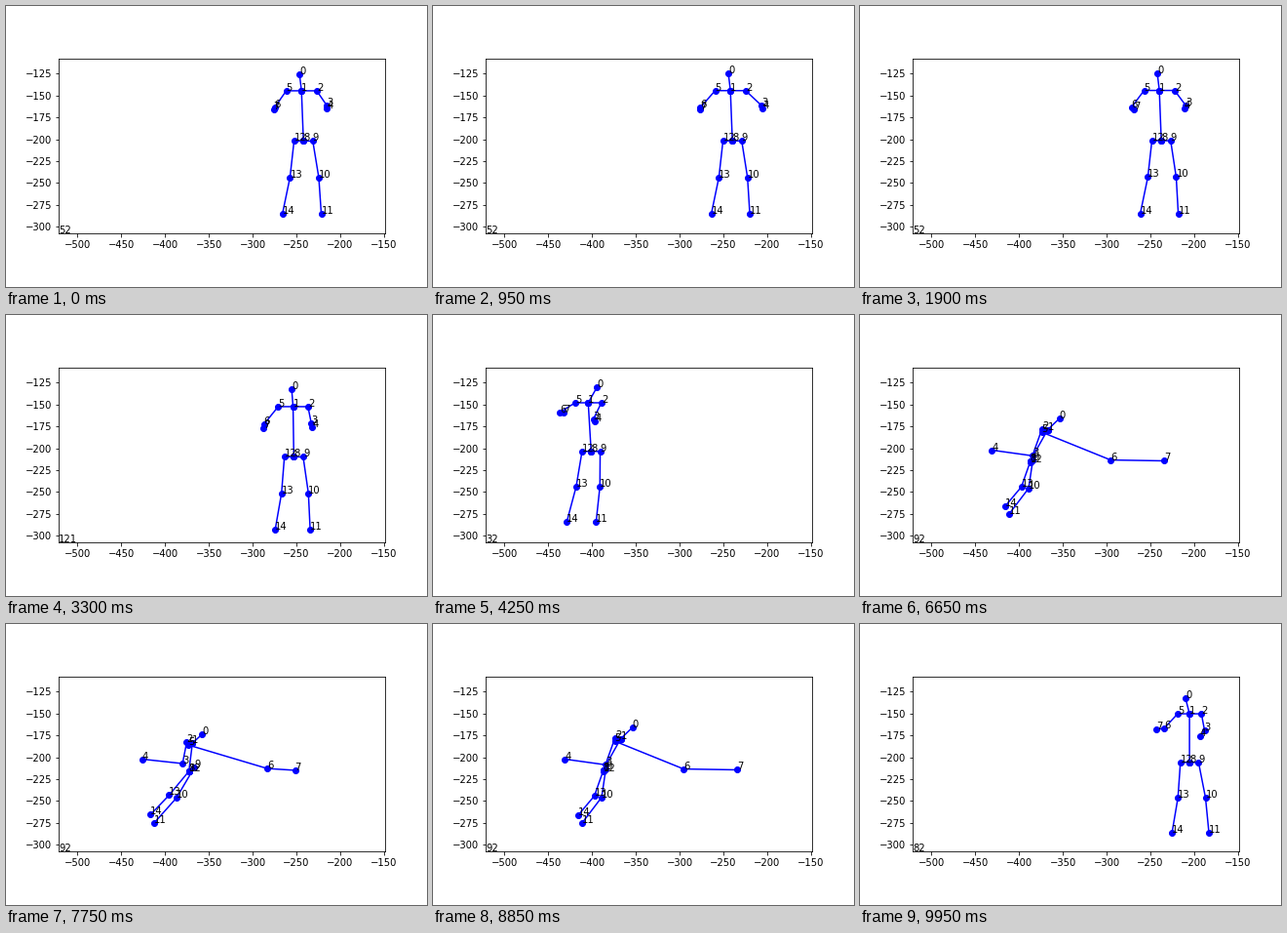
A matplotlib script for the animation above (10000 ms loop, 432 px wide and 288 px high).

```python
import numpy as np
import matplotlib.pyplot as plt
from matplotlib.animation import FuncAnimation

FRAMES, STEP_MS = 200, 50
X_LIM, Y_LIM = (-521.4, -149), (-307, -108)
LIMBS = [[0, 1, 8], [1, 2, 3, 4], [1, 5, 6, 7], [8, 9, 10, 11], [8, 12, 13, 14]]

# Points are complex numbers, x + y*1j, in data units.


def standing(neck, head, arms, hip, feet, half=17, size=1.0):
    """Upright figure; all arguments after neck are offsets from it."""
    hip = hip - 57.3j * size
    feet = [x - 140.5j * size for x in feet]
    hips = [hip + 10.7 * size, hip - 10.7 * size]
    right, left = ([h, (h + f) / 2 + 2, f] for h, f in zip(hips, feet))
    body = [head, 0, half, *arms[:2], -half, *arms[2:], hip, *right, *left]
    return neck + np.array(body)


def bent_over(e, lift):
    """Figure leaning forward; e shifts the weight, lift raises and reaches."""
    neck = -367.7 - 183.9j - e + lift * (1 + 5j)
    hip = -402 - 213.3j + e * (29.3 - 2.7j)
    near_arm = [-389.3 - 210j + e * (9.3 + 2.8j), -421.6 - 202.2j - 4.6 * e - 7 * lift]
    far_arm = [-307.7 - 213.9j + e * (24.5 + 1j), -241.6 - 213.9j - e * (10 + 1j) + 12 * lift]
    right = [hip - 3.5j + e * (6 + 7.5j), -391 - 245j + e * (4 - 1.5j),
             -410.4 - 275.4j - 2.4 * e]
    left = [hip - 2.5j + 2.5j * e, -399.3 - 245j + e * (4 + 1.7j),
            -415 - 266.7j - e * (1.6 - 1.2j)]
    head = neck + 16 + 10j - 5 * e + 3j * lift
    return np.array([head, neck, neck - 6.5 + 1j, *near_arm,
                     neck - 9.3 - 3.3j + e * (5 + 1j), *far_arm, hip, *right, *left])


def swing(n, start, span):
    """Ease 0-1-0 over two spans, and a bulge that peaks half-way."""
    phase = np.pi * (n - start) / span
    return (1 - np.cos(phase)) / 2, np.sin(phase) ** 2


def rock(n, centre):
    return 2.5 * np.sin(2 * np.pi * (n - centre) / 30)


def arms_bent(n):
    e, flare = swing(n, 0, 38)
    arms = [29.2 - 17.2j + e + 6 * flare, 29.2 - 20.2j - 0.5 * e + 8 * flare,
            -30.8 - 19.2j - e - 3 * flare, -31.8 - 21.2j + 3 * e - 4 * flare]
    return standing(-244.2 - 144.8j + e * (4.4 + 0.4j), -2.3 + 19.3j, arms,
                    2.2, (22.6 - e, -21.8), half=17.4)


def arms_down(n):
    arms = [20.8 - 19j, 21.8 - 23.2j, -33.2 - 20j, -34 - 24.4j]
    return standing(-253.8 - 152.6j + rock(n, 66), -1.6 + 19.8j, arms, 0.8, (19.5, -20.5))


def turned(n):
    arms = [6 - 18.4j, 7.8 - 21.1j, -32.7 - 11.1j, -28.4 - 11.1j]
    return standing(-404.3 - 148.2j + rock(n, 85), 10 + 17.8j, arms,
                    3.3, (9, -24.5), half=15, size=0.967)


def arm_out(n):
    arms = [17.2 - 18.9j, 11.6 - 25.5j, -28.9 - 16.7j, -37.8 - 17.8j]
    return standing(-205.4 - 150.5j + rock(n, 199), -4.5 + 17.7j, arms,
                    0, (22.2, -20), half=13.6, size=0.967)


def leaning(n):
    return bent_over(*swing(n, 111, 44))


# Hard cuts: (end frame, caption, pose)
SCENES = [(53, "52", arms_bent), (74, "121", arms_down), (95, "32", turned),
          (182, "92", leaning), (FRAMES, "82", arm_out)]

plt.rcParams.update({"font.family": "DejaVu Sans", "font.size": 10})
fig = plt.figure(figsize=(6, 4), dpi=72, facecolor="white")
fig.subplots_adjust(left=0.125, right=0.9, bottom=0.125, top=0.88)
ax = fig.add_subplot()
ax.set(xlim=X_LIM, ylim=Y_LIM, aspect="equal")
ax.set_xticks(range(-500, -149, 50))
ax.set_yticks(range(-300, -124, 25))

lines = [ax.plot([], [], "bo-", lw=1.5, ms=6)[0] for _ in LIMBS]
labels = [ax.text(0, 0, str(j)) for j in range(15)]
caption = ax.text(X_LIM[0], Y_LIM[0], "")


def draw(n):
    name, pose = next((name, pose) for end, name, pose in SCENES if n < end)
    points = pose(n)
    caption.set_text(name)
    for line, limb in zip(lines, LIMBS):
        line.set_data(points[limb].real, points[limb].imag)
    for label, p in zip(labels, points):
        label.set_position((p.real, p.imag))
    return [*lines, *labels, caption]


anim = FuncAnimation(fig, draw, frames=FRAMES, interval=STEP_MS,
                     repeat=True, repeat_delay=0)
plt.show()
```
